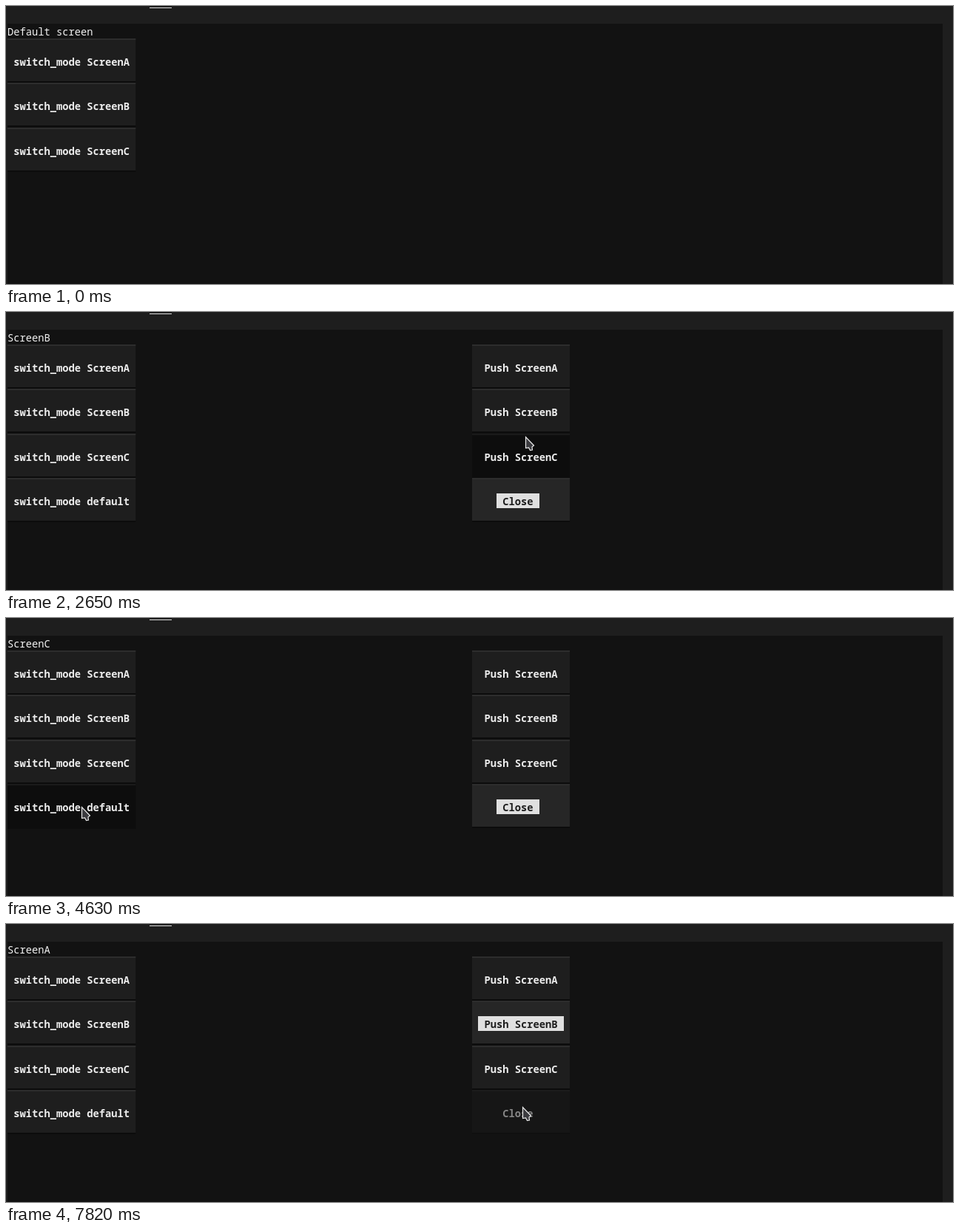
Recreate the animation shown at these times as an HTML page with a canvas. Size 1280x377 px, loop 8000 ms.

```html
<!DOCTYPE html>
<html lang="en">
<head>
<meta charset="utf-8">
<title>Screen modes</title>
<style>
  html, body { margin: 0; width: 100%; height: 100%; overflow: hidden; background: #121212; }
  canvas { display: block; }
</style>
</head>
<body>
<canvas id="stage" width="1280" height="377"></canvas>
<script>
const ctx = document.getElementById('stage').getContext('2d');
const LOOP = 8000, HOVER_LAG = 80;
const FONT = '13.75px "Noto Sans Mono", "DejaVu Sans Mono", monospace';
const CELL = 8.25, ROW_TOP = 44, ROW_PITCH = 60.5;

const NAMES = ['ScreenA', 'ScreenB', 'ScreenC'];
const COLUMNS = {
  L: { x: 2, cells: 21, labels: [...NAMES, 'default'].map(name => `switch_mode ${name}`) },
  R: { x: 630, cells: 16, labels: [...NAMES.map(name => `Push ${name}`), 'Close'] }
};

// Each move eases from the previous resting point; bend bows the path downwards.
const ENTRY = { x: 754, y: 7 };
const MOVES = [
  { start: 120, end: 920, x: 124, y: 79, bend: 115 },
  { start: 1220, end: 1840, x: 690, y: 85, bend: 20 },
  { start: 1860, end: 2080, x: 703, y: 138, bend: 0 },
  { start: 2430, end: 2570, x: 702, y: 169, bend: 0 },
  { start: 3550, end: 4150, x: 85, y: 236, bend: -80 },
  { start: 4150, end: 4230, x: 56, y: 191, bend: 0 },
  { start: 4270, end: 4710, x: 106, y: 262, bend: 0 },
  { start: 5495, end: 5720, x: 110, y: 80, bend: 0 },
  { start: 6170, end: 6950, x: 698, y: 248, bend: 58 }
];

// A press focuses the button, its release runs the action.
const CLICKS = [
  { down: 880, up: 1040, button: 'L0' },
  { down: 2290, up: 2410, button: 'R1' },
  { down: 3100, up: 3260, button: 'R2' },
  { down: 4910, up: 5070, button: 'L3' },
  { down: 6050, up: 6170, button: 'L0' },
  { down: 7090, up: 7250, button: 'R3' },
  { down: 7660, up: 7820, button: 'R3' }
];

function labelOf([column, row]) {
  return COLUMNS[column].labels[row];
}

// Every mode keeps its own stack of screens.
function screenAt(t) {
  const modes = { default: [{ title: 'Default screen', focus: '' }] };
  let stack = modes.default, changed = 0;
  for (const { down, up, button } of CLICKS) {
    if (t < down) break;
    stack.at(-1).focus = button;
    if (t < up) break;
    changed = up;
    const [verb, name] = labelOf(button).split(' ');
    if (verb === 'Close') stack.pop();
    else if (verb === 'Push') stack.push({ title: name, focus: 'R3' });
    else stack = modes[name] ??= [{ title: name, focus: 'L0' }];
  }
  return { ...stack.at(-1), changed, isDefault: stack === modes.default, canClose: stack.length > 1 };
}

function pointerAt(t) {
  let { x, y } = ENTRY;
  for (const move of MOVES) {
    if (t < move.start) break;
    const k = Math.min(1, (t - move.start) / (move.end - move.start));
    const eased = k * k * (3 - 2 * k);
    x += (move.x - x) * eased;
    y += (move.y - y) * eased + move.bend * Math.sin(Math.PI * k);
  }
  return { x, y };
}

function buttonUnder({ x, y }) {
  const row = Math.floor((y - ROW_TOP) / ROW_PITCH);
  const column = Object.keys(COLUMNS).find(key => {
    const { x: left, cells } = COLUMNS[key];
    return x >= left && x < left + cells * CELL;
  });
  return column + row;
}

// A new screen shows no hover until the pointer moves again.
function hoveredAt(t, changed) {
  const seen = t - HOVER_LAG;
  const moved = MOVES.some(move => move.start < seen && move.end > changed);
  return moved ? buttonUnder(pointerAt(seen)) : '';
}

function rect(color, x, y, w, h) {
  ctx.fillStyle = color;
  ctx.fillRect(x, y, w, h);
}

function text(label, x, baseline, color, weight = '') {
  ctx.font = `${weight} ${FONT}`;
  ctx.fillStyle = color;
  ctx.fillText(label, x, baseline);
}

function drawButton(id, { focused, hovered, disabled }) {
  const { x, cells } = COLUMNS[id[0]];
  const label = labelOf(id), width = cells * CELL;
  const textX = x + Math.floor((cells - label.length) / 2) * CELL;
  const top = ROW_TOP + id[1] * ROW_PITCH, y = Math.floor(top);
  if (hovered && !disabled) {
    rect('#0d0d0d', x, y, width, 61);
    rect('#1a1a1a', x, y, width, 2);
  } else {
    rect(disabled ? '#161616' : focused ? '#262626' : '#1e1e1e', x, y, width, 58);
    rect(disabled ? '#1c1c1c' : '#2d2d2d', x, y, width, 2);
    rect(disabled ? '#101010' : '#0c0c0c', x, y + 58, width, 2);
  }
  if (focused) rect('#e0e0e0', Math.round(textX - CELL), Math.round(top + 20), Math.round((label.length + 2) * CELL), 20);
  text(label, textX, y + 37, disabled ? '#858585' : focused ? '#1e1e1e' : '#ececec', 'bold');
}

function drawPointer({ x, y }) {
  ctx.save();
  ctx.translate(Math.round(x) + 0.5, Math.round(y) + 0.5);
  const outline = new Path2D('M0 0V15L4 14.5L6 18L9 17.5L8.5 13.5L11 11.5Z');
  ctx.fillStyle = '#3c3c40';
  ctx.strokeStyle = '#e8e8e8';
  ctx.lineWidth = 1.2;
  ctx.fill(outline);
  ctx.stroke(outline);
  ctx.restore();
}

function draw(t) {
  const screen = screenAt(t);
  const hover = hoveredAt(t, screen.changed);

  rect('#1e1e1e', 0, 0, 1280, 377);
  rect('#121212', 2, 24, 1264, 353);
  rect('#e0e0e0', 194, 2, 30, 1);
  text(screen.title, 2, 40, '#f2f2f2');

  for (const column of screen.isDefault ? 'L' : 'LR') {
    for (let row = 0; row < (screen.isDefault ? 3 : 4); row++) {
      const id = column + row;
      drawButton(id, {
        focused: screen.focus === id,
        hovered: hover === id,
        disabled: id === 'R3' && !screen.canClose
      });
    }
  }
  if (t >= MOVES[0].start) drawPointer(pointerAt(t));
}

const start = performance.now();
function tick() {
  draw((performance.now() - start) % LOOP);
  requestAnimationFrame(tick);
}
tick();
</script>
</body>
</html>
```
